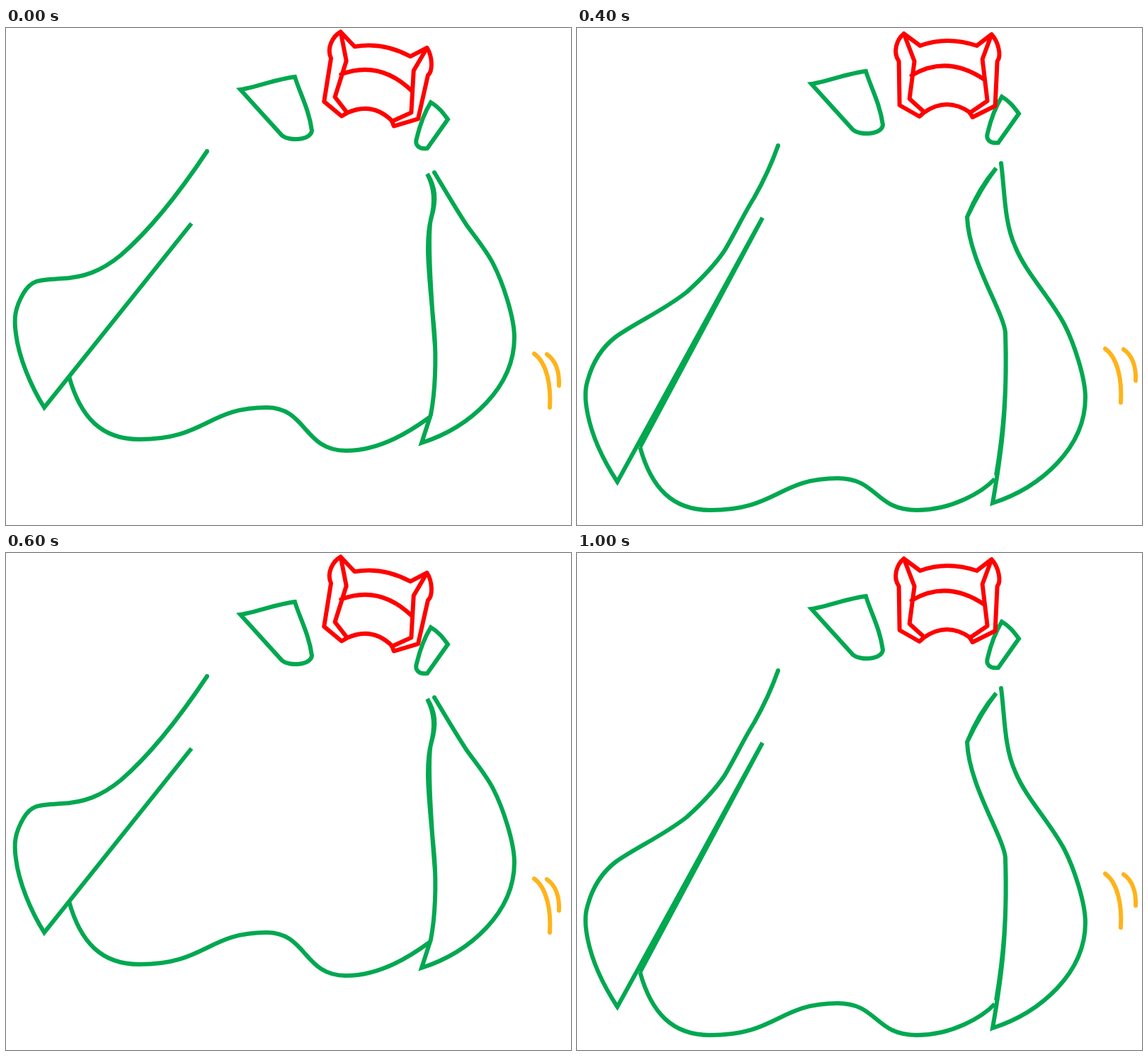
Recreate the animation shown at these times as an HTML page with a canvas. Size 798x702 px, loop 1200 ms.

```html
<!DOCTYPE html>
<html>
<head>
<meta charset="utf-8">
<style>
html, body { margin: 0; width: 100%; height: 100%; overflow: hidden; background: #fff; }
canvas { display: block; }
</style>
</head>
<body>
<canvas id="stage" width="798" height="702"></canvas>
<script>
const ctx = document.getElementById("stage").getContext("2d");
const GREEN = "#00a850", RED = "#ff0000", AMBER = "#ffb31a";
const STEP = 200;

const flaps = `M331 87C352 84 382 72 408 69C415 92 428 115 432 145C430 159 400 160 390 152Z
  M600 105C612 112 618 121 624 129L595 170C583 172 577 165 580 156C585 135 592 118 600 105Z`;

const leftUp = `M284 174C250 225 205 284 162 321C135 343 110 353 76 354
  C45 356 36 356 25 374C12 396 11 411 14 432C18 465 35 506 54 536L262 276`;
const leftDown = `M284 174C278 191 267 218 250 248C236 270 222 300 208 323
  C195 342 175 363 155 381C122 407 85 423 55 444C34 460 22 480 15 506
  C11 518 11 533 15 553C22 588 40 623 57 649L262 276M89 600L262 276`;

// Lower outline of the right wing, shared by every pose
const lobe = "c14 27 30 76 30 104c0 71 -63 127 -131 149";
const rightUp = `M605 204C620 229 637 258 651 279C664 297 679 315 688 333${lobe}
  L600 546C606 515 608 470 605 430C603 403 596 345 596 312C596 290 598 277 601 267
  C608 243 607 225 595 206C605 225 607 245 600 270C594 300 602 400 606 450`;
const rightDown = top => `${top} 619 317C634 354 668 388 688 426${lobe}
  C600 605 608 545 605 438C602 408 553 335 551 275Q567 235 592 206
  Q571 233 551 275M605 438C608 520 602 580 592 640`;

const hem = (hump, low, endX, endY) => `M89 ${hump - 44}
  C105 ${hump + 14} 135 ${hump + 45} 188 ${hump + 45}
  C282 ${hump + 45} 285 ${hump} 368 ${hump}
  C425 ${hump} 420 ${low} 480 ${low}
  C530 ${low} 573 ${endY + 18} ${endX} ${endY}`;

const mask = `M462 8C452 16 446 34 455 47L456 109L484 125L491 119Q523 97 555 119L559 126
  L591 110L594 47C600 40 596 20 586 9L565 25Q523 11 485 25L462 8
  L477 47L470 100L491 119M586 9L573 44L580 103L555 120M473 67Q523 37 576 73`;

const poses = [
  { lift: 0, left: leftUp, right: rightUp, hem: hem(536, 597, 598, 550),
    tip: [605, 204], tilt: 10, maskY: 7.2, sparkY: 0, sparkX: 0 },
  { lift: -5, left: leftUp, right: rightDown("M605 204C602 236 606 282"),
    hem: hem(536, 689, 590, 645),
    tip: [605, 204], tilt: 5, maskY: 1.7, sparkY: -6, sparkX: 0 },
  { lift: -8, left: leftDown, right: rightDown("M599 199C604 235 603 282"),
    hem: hem(644, 689, 590, 645),
    tip: [599, 199], tilt: 0, maskY: 0, sparkY: -7, sparkX: 8 }
];

function stroke(d, color, cap = "butt", join = "miter") {
  ctx.strokeStyle = color;
  ctx.lineCap = cap;
  ctx.lineJoin = join;
  ctx.stroke(new Path2D(d));
}

function at(x, y, paint) {
  ctx.save();
  ctx.translate(x, y);
  paint();
  ctx.restore();
}

function draw(now) {
  const p = poses[Math.floor(now / STEP) % poses.length];
  ctx.fillStyle = "#fff";
  ctx.fillRect(0, 0, 798, 702);
  ctx.lineWidth = 6;

  at(0, p.lift, () => {
    [flaps, p.left, p.right, p.hem].forEach(d => stroke(d, GREEN));
    stroke(`M284 174h.01M${p.tip}h.01`, GREEN, "round");
  });

  at(522.6, 66.5 + p.maskY, () => {
    ctx.rotate(p.tilt * Math.PI / 180);
    ctx.translate(-523, -66.5);
    stroke(mask, RED, "round", "round");
  });

  at(0, p.sparkY, () => stroke("M746 460C764 473 770 505 768 536", AMBER, "round"));
  at(p.sparkX, p.sparkY, () => stroke("M764 461C776 469 782 485 781 505", AMBER, "round"));

  requestAnimationFrame(draw);
}
requestAnimationFrame(draw);
</script>
</body>
</html>
```
